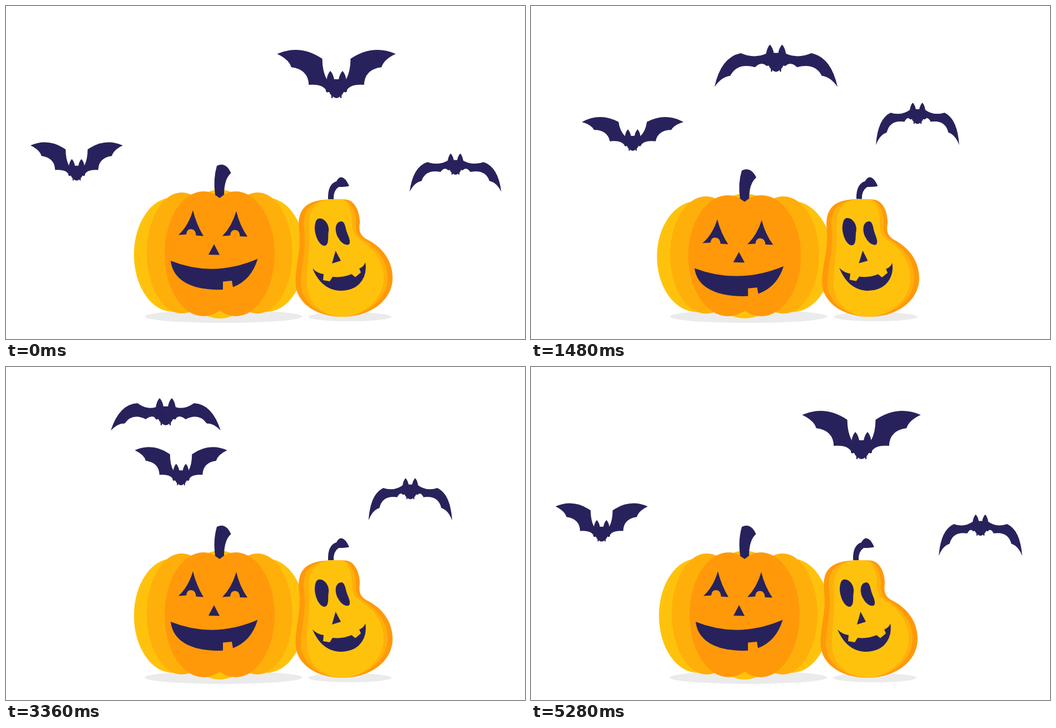
An HTML page that plays this animation: 933 px wide and 600 px high, repeating every 5320 ms.

```html
<!DOCTYPE html>
<html lang="en">
<head>
<meta charset="utf-8">
<title>Pumpkins and bats</title>
<style>
  html, body { margin: 0; width: 100%; height: 100%; overflow: hidden; background: #fff; }
  svg { display: block; width: 933px; height: 600px; }
  .shade { fill: #ebebeb; }
  .ink { fill: #28225c; }
  .light { fill: #ffc20c; }
  .mid { fill: #ffaf0a; }
  .deep { fill: #ff990a; }
</style>
</head>
<body>
<svg viewBox="0 0 933 600">
  <ellipse class="shade" cx="391" cy="559.5" rx="141.5" ry="11.5"/>
  <ellipse class="shade" id="shadow" cx="618" cy="560" rx="75" ry="8"/>

  <g id="round">
    <g class="light">
      <ellipse cx="384" cy="447" rx="80" ry="116"/>
      <ellipse cx="300" cy="448" rx="70" ry="103"/>
      <ellipse cx="468" cy="448" rx="70" ry="103"/>
    </g>
    <g class="mid">
      <ellipse cx="316" cy="445" rx="63" ry="109"/>
      <ellipse cx="452" cy="445" rx="63" ry="109"/>
    </g>
    <g class="deep">
      <ellipse cx="355" cy="446.5" rx="70" ry="112.5"/>
      <ellipse cx="413" cy="446.5" rx="70" ry="112.5"/>
    </g>
    <path class="ink" d="M379 288Q395 280 404.500 301Q392 312 392 340L384 346L376 340.500Q372 312 379 288Z"/>
    <g class="ink" id="face">
      <path d="M336 368Q342 393 355 414.500L341.500 413.500Q341 402 332 402Q325 402 324 411.500L310 412.500Q328 396 336 368Z"/>
      <path d="M414 369.500Q420 395 434 415.500L420.500 415Q420 403.500 411 403.500Q404 403.500 403 413.500L389 414.500Q406 397 414 369.500Z"/>
      <path d="M374 429L384 448.500L364 448Z"/>
      <path d="M296 459Q373 490 452.500 455.500Q441 494 408 506.500L406 495L390 496.500V511C330 513 300 492 296 459Z"/>
    </g>
  </g>

  <g id="pear">
    <path class="deep" d="M580 348.500H610C628 350 636 372 636 390C634 404 636 413 648 420C678 435 695 460 695 490C695 530 655 560 605 560C555 560 520.500 533 520.500 498C520.500 465 531 440 527 405C523 370 535 350 580 348.500Z"/>
    <path class="mid" d="M580 348.500H606C621 352 629 372 629 390C627 404 632 415 643 421C672 440 686 462 686 490C686 530 645 558 605 560C560 558 530 533 530 498C531 465 540 440 536 405C532 375 540 354 580 348.500Z"/>
    <path class="light" d="M580 348.500H603C616 352 622 372 622 390C621 406 627 416 640 423C664 440 679 462 679 490C679 530 640 559 605 560C565 558 541 533 541 498C541 465 547 440 545 405C542 375 552 352 580 348.500Z"/>
    <g class="ink">
      <path d="M579 348Q578 321 594 316Q598 308 603 308.500Q610 309 617 324Q613 326 598 326Q588 333 589 348Z"/>
      <path d="M562 383C572 381 582 394 580 406C578 414 582 432 572 432C562 430 556 414 555 402C555 392 557 384 562 383Z"/>
      <path d="M603 388C610 389 610 400 613 408C616 416 620 424 617 429C612 433 602 427 597 417C591 407 590 389 603 388Z"/>
      <path d="M592.500 441L602 459L586 464Z"/>
      <path d="M551 473Q560 482 571 483L570 494L582 496L587 488Q606 490 621 483L628 488.500L638 480L635 473Q643 470 646 462Q650 486 634 502Q622 513 600 513Q567 511 551 473Z"/>
    </g>
  </g>
  <g id="bats" class="ink"></g>
</svg>
<script>
const LOOP = 5320, STEP = 40, LAST = LOOP - STEP;
const $ = id => document.getElementById(id);
const { sin, cos, PI, max, min, floor } = Math;

const BODY = 'M-18-32Q-16-44-11-49Q-6-44-4-34H4Q6-44 11-49Q16-44 18-32' +
  'L19-12L16-10L14-13L11-7L9.500-6L9 0L7 0L6.500-3Q0 3-6.500-3L-7 0L-9 0L-9.500-6L-11-7L-14-13L-16-10L-19-12Z';

// Left wing from shoulder to belly: curve controls alternating with corners.
const UP = [-25, -48, -25, -71, -64, -98, -105, -80, -84, -70, -80, -56, -50, -52, -49, -24, -22, -26];
const DOWN = [-37, -18, -62, -26, -92, -12, -96, 49, -87, 25, -71, 20, -64, -10, -30, -5, -24, -18];

// Each bat glides from one point to another and back, and bows upwards on the way out.
const bats = [
  { size: 1, from: [594, 166], to: [272, 102], turn: 3050, ease: 1, bow: 17, beat: .01, beats: 11, sway: .65 },
  { size: .79, from: [127, 314.5], to: [315, 213], turn: 3300, ease: 1.25, bow: 28, beat: 0, beats: 11, sway: 0 },
  { size: .78, from: [808, 304], to: [677, 198], turn: 1950, ease: 1, bow: 0, beat: .38, beats: 11.18, sway: 0 }
];

for (const bat of bats) {
  bat.el = document.createElementNS('http://www.w3.org/2000/svg', 'g');
  bat.el.innerHTML = `<path d="${BODY}"/><path/><path transform="scale(-1 1)"/>`;
  $('bats').append(bat.el);
}

function position({ from, to, turn, ease, bow }, t) {
  const out = t < turn;
  const u = out ? (t / turn) ** ease : (LAST - t) / (LAST - turn);
  const s = (1 - cos(PI * u)) / 2;
  const [x, y] = from.map((v, i) => v + (to[i] - v) * s);
  return [x, out ? y - 4 * bow * s * (1 - s) : y];
}

function beatAngle({ beat, beats, sway }, t) {
  const u = t / LAST;
  const drift = sway * sin(2 * PI * (u - .03)) * sin(PI * u) ** 4;
  const a = 2 * PI * (beat + beats * u + drift);
  return a + .3 * sin(a); // lingers in the low half
}

// Wings sweep between the two poses and stretch wide on the downstroke.
function wingPath(angle) {
  const low = (1 - cos(angle)) / 2, stretch = 1 + .18 * max(0, sin(angle));
  const points = UP.map((v, i) => (v + (DOWN[i] - v) * low) * (i % 2 ? 1 : stretch));
  return `M-10-33H-17Q${points.map(v => v.toFixed(2)).join(' ')} -17 -11H-10Z`;
}

function draw(t) {
  for (const bat of bats) {
    const wing = wingPath(beatAngle(bat, t));
    const [, left, right] = bat.el.children;
    left.setAttribute('d', wing);
    right.setAttribute('d', wing);
    bat.el.setAttribute('transform', `translate(${position(bat, t)}) scale(${bat.size})`);
  }
  const squash = sin(PI * min(1, max(0, (t - 1100) / 1650))) ** 2;
  const slide = `translate(${3 * squash} 0)`;
  $('round').setAttribute('transform',
    `translate(384 563) scale(${1 + .053 * squash} ${1 - .07 * squash}) translate(-384 -563)`);
  $('face').setAttribute('transform', `translate(0 ${24 * squash})`);
  $('pear').setAttribute('transform', `${slide} rotate(${2.8 * squash} 606 560)`);
  $('shadow').setAttribute('transform', slide);
}

const start = performance.now();
function tick(now) {
  const t = max(0, now - start) % LOOP;
  draw(floor(t / STEP) * STEP);
  requestAnimationFrame(tick);
}
draw(0);
requestAnimationFrame(tick);
</script>
</body>
</html>
```
